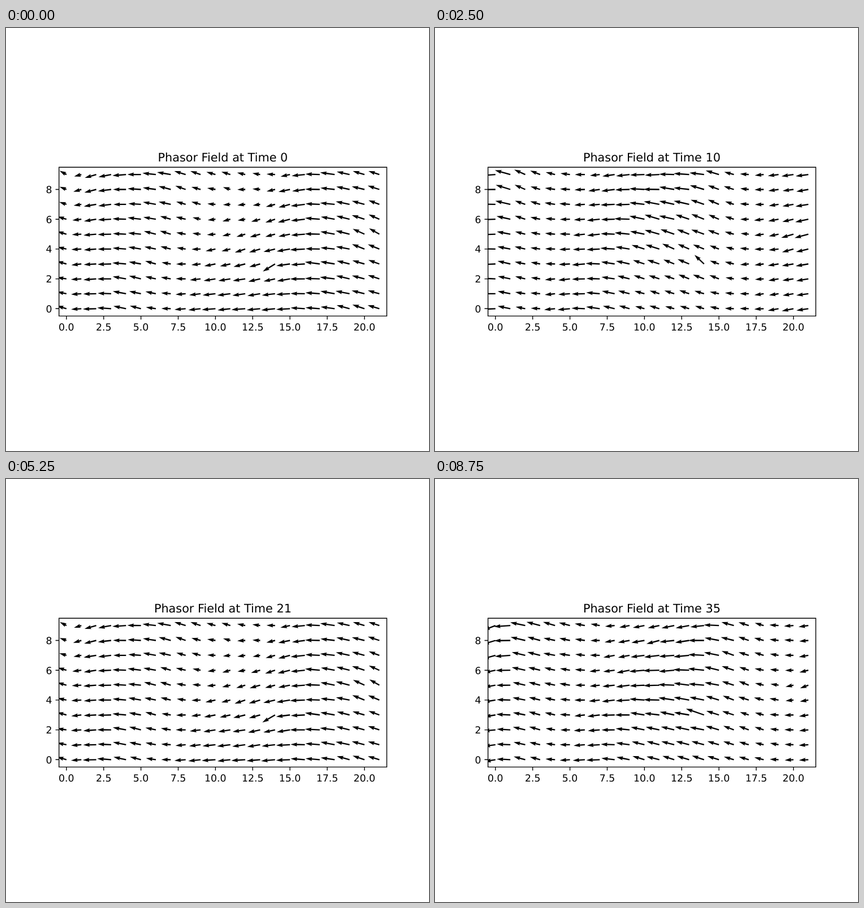
Recreate the animation shown at these times as an HTML page. Size 748 by 748 pixels, loop 9000 ms.

```html
<!DOCTYPE html>
<html lang="en">
<head>
<meta charset="utf-8">
<title>Phasor field</title>
<style>
  html, body { margin: 0; width: 100%; height: 100%; overflow: hidden; background: #fff; }
  svg { display: block; width: 748px; height: 748px; }
  text { font-family: "DejaVu Sans", sans-serif; font-size: 17.31px; text-rendering: geometricPrecision; }
  #title { font-size: 20.78px; text-anchor: middle; }
  .x { text-anchor: middle; }
  .y { text-anchor: end; }
  #axes { fill: none; stroke: #000; stroke-width: 1.39; }
</style>
</head>
<body>
<svg viewBox="0 0 748 748">
  <clipPath id="box"><rect x="93.7" y="246.2" width="579.7" height="263.2"/></clipPath>
  <path id="arrows" clip-path="url(#box)"/>
  <path id="axes"/>
  <text id="title" x="383.4" y="235.6"></text>
  <g id="labels"></g>
</svg>
<script>
const STEP = 250, STEPS = 36, PERIOD = 21.2;
const COLS = 22, ROWS = 10, UNIT = 26.35;
const WIDTH = 2.35, HEAD = 5 * WIDTH;
const MEAN = [-20.5, -1.5];
const LEFT = 93.7, RIGHT = 673.4, TOP = 246.2, BOTTOM = 509.4;

// The wave winds almost twice from left to right: [column, degrees].
const PHASE = [[0, -30], [2, 110], [5, 215], [8, 350], [10, 405], [14, 430], [17, 540], [21, 640]];

// Places where the wave is stronger or weaker: [column, row, change, radius].
const BUMPS = [[0.5, 8.5, 5, 1.6], [5, 7, -2, 2], [5, 1.5, -1.6, 4], [12, 6, 3.5, 2.5], [14, 3, 9, 0.4], [21, 5, 4, 1]];

const $ = id => document.getElementById(id);
const px = c => 106.88 + c * UNIT;
const py = r => 496.3 - r * UNIT;

let seed = 7;
function jitter(size) {
  seed = (seed * 16807) % 2147483647;
  return (seed / 2147483647 * 2 - 1) * size;
}

function phase(c, r) {
  const i = Math.max(1, PHASE.findIndex(([x]) => x >= c));
  const [x0, a0] = PHASE[i - 1], [x1, a1] = PHASE[i];
  const tilt = c < 18 ? 18 * Math.sin(Math.PI * c / 18) : 0;
  return (a0 + (a1 - a0) * (c - x0) / (x1 - x0) + tilt * (4.5 - r)) * Math.PI / 180;
}

function strength(c, r) {
  return BUMPS.reduce((sum, [x, y, change, radius]) =>
    sum + change * Math.exp(-((c - x) ** 2 + (r - y) ** 2) / (2 * radius ** 2)), 5);
}

const arrows = [];
for (let r = 0; r < ROWS; r++)
  for (let c = 0; c < COLS; c++)
    arrows.push({ x: px(c), y: py(r), phase: phase(c, r) + jitter(0.25), size: strength(c, r) + jitter(0.8) });

function arrowPath(x, y, u, v) {
  const len = Math.hypot(u, v), w = WIDTH * Math.min(1, len / HEAD);
  const cos = u / len, sin = v / len;
  const neck = len - 4.5 * w, barb = len - 5 * w;
  const pts = [[0, w / 2], [neck, w / 2], [barb, 1.5 * w], [len, 0],
               [barb, -1.5 * w], [neck, -w / 2], [0, -w / 2]];
  return "M" + pts.map(([a, b]) =>
    (x + a * cos - b * sin).toFixed(2) + " " + (y + a * sin + b * cos).toFixed(2)).join("L") + "Z";
}

function drawAxes() {
  let d = `M${LEFT} ${TOP}H${RIGHT}V${BOTTOM}H${LEFT}Z`, labels = "";
  for (let v = 0; v <= 20; v += 2.5) {
    d += `M${px(v)} ${BOTTOM}v6.1`;
    labels += `<text class="x" x="${px(v)}" y="535">${v.toFixed(1)}</text>`;
  }
  for (let v = 0; v <= 8; v += 2) {
    d += `M${LEFT} ${py(v)}h-6.1`;
    labels += `<text class="y" x="81.4" y="${py(v) + 6.4}">${v}</text>`;
  }
  $("axes").setAttribute("d", d);
  $("labels").innerHTML = labels;
}

function draw(n) {
  const turn = 2 * Math.PI * n / PERIOD;
  $("arrows").setAttribute("d", arrows.map(({ x, y, phase, size }) =>
    arrowPath(x, y, MEAN[0] + size * Math.cos(phase - turn), MEAN[1] + size * Math.sin(phase - turn))).join(""));
  $("title").textContent = "Phasor Field at Time " + n;
}

let shown = -1;
function tick() {
  const n = Math.floor(performance.now() / STEP) % STEPS;
  if (n !== shown) draw(shown = n);
  requestAnimationFrame(tick);
}

drawAxes();
tick();
</script>
</body>
</html>
```
